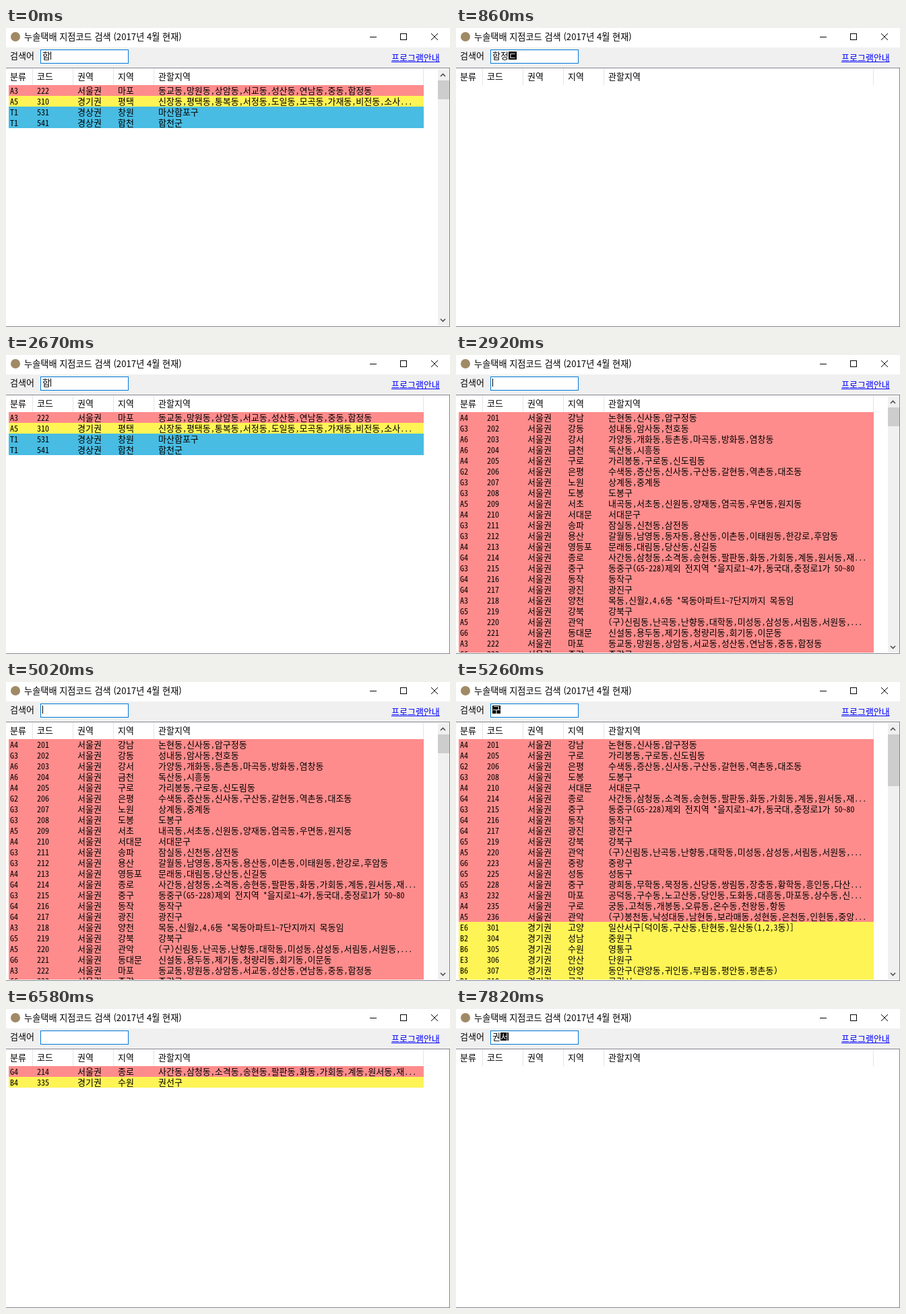
An HTML page for the animation above (8000 ms loop, 659 by 445 pixels).

```html
<!DOCTYPE html>
<html lang="ko">
<head>
<meta charset="utf-8">
<style>
  html, body { margin: 0; width: 100%; height: 100%; overflow: hidden; background: #fff; }
  body, body * { position: absolute; box-sizing: border-box; white-space: pre; }
  body { font: 13px/16px 'Noto Sans Mono CJK KR', 'Noto Sans CJK KR', 'Noto Sans CJK', monospace; color: #000; }
  #icon { left: 7px; top: 6px; width: 14px; height: 14px; border-radius: 50%; background: #a08a66; }
  #title { left: 27px; top: 4px; font: 13.2px/18px 'Noto Sans CJK KR', 'Noto Sans CJK', sans-serif; }
  #tools { left: 0; top: 29px; width: 659px; height: 30px; background: #f0f0f0; }
  #label { left: 6px; top: 4px; }
  #box { left: 51px; top: 3px; width: 131px; height: 21px; border: 1px solid #0078d7; background: #fff; }
  #field { left: 2px; top: 2px; height: 12px; line-height: 12px; }
  #field * { position: static; display: inline-block; height: 12px; vertical-align: top; overflow: hidden; }
  #field b { background: #000; color: #fff; font-weight: 400; }
  #field i { width: 1px; background: #000; }
  #link { left: 572px; top: 7px; color: #00f; text-decoration: underline; }
  #list { left: 0; top: 59px; width: 659px; height: 386px; border: 1px solid #828790; border-left: 0; overflow: hidden; }
  #head { left: 0; top: 0; }
  #head span { top: 4px; }
  #head i { top: 0; width: 1px; height: 25px; background: #e5e5e5; }
  #rows { left: 4px; top: 25px; width: 616px; height: 358px; overflow: hidden; }
  #rows div { left: 0; width: 616px; height: 16px; font-size: 12px; line-height: 15px; }
  #rows b { position: static; font-size: 13px; font-weight: 400; line-height: 1; }
  #bar { left: 641px; top: 1px; width: 17px; height: 382px; background: #f0f0f0; }
  #thumb { left: 0; top: 17px; width: 17px; background: #cdcdcd; }
  svg { left: 0; top: 0; fill: none; }
</style>
</head>
<body>
<div id="icon"></div>
<div id="title">누솔택배 지점코드 검색 (2017년 4월 현재)</div>
<svg width="659" height="28" stroke="#000">
  <path d="M540 13.5h10M585.5 8.5h9v9h-9z" shape-rendering="crispEdges"/>
  <path d="M631 8l10 10M641 8l-10 10"/>
</svg>
<div id="tools">
  <span id="label">검색어</span>
  <div id="box"><div id="field"></div></div>
  <span id="link">프로그램안내</span>
</div>
<div id="list">
  <div id="head"></div>
  <div id="rows"></div>
  <div id="bar">
    <div id="thumb"></div>
    <svg width="17" height="382" stroke="#505050" stroke-width="1.6"><path d="M4 11l3.500-3.500 3.500 3.500M4 372l3.500 3.500 3.500-3.500"/></svg>
  </div>
</div>
<script>
const LOOP = 8000, VISIBLE = 23, MAX_CELLS = 64;
const COLUMNS = [6, 46, 106, 166, 226];
const ZONES = { 2: ['서울권', '#ff8c8c'], 3: ['경기권', '#fff455'], 5: ['경상권', '#48bce3'] };

const branches = `A4 201 강남 논현동,신사동,압구정동
G3 202 강동 성내동,암사동,천호동
A6 203 강서 가양동,개화동,등촌동,마곡동,방화동,염창동
A6 204 금천 독산동,시흥동
A4 205 구로 가리봉동,구로동,신도림동
G2 206 은평 수색동,증산동,신사동,구산동,갈현동,역촌동,대조동
G3 207 노원 상계동,중계동
G3 208 도봉 도봉구
A5 209 서초 내곡동,서초동,신원동,양재동,염곡동,우면동,원지동
A4 210 서대문 서대문구
G3 211 송파 잠실동,신천동,삼전동
G3 212 용산 갈월동,남영동,동자동,용산동,이촌동,이태원동,한강로,후암동
A4 213 영등포 문래동,대림동,당산동,신길동
G4 214 종로 사간동,삼청동,소격동,송현동,팔판동,화동,가회동,계동,원서동,재동,권농동,구기동
G3 215 중구 동중구(G5-228)제외 전지역 *을지로1~4가,동국대,충정로1가 50~80
G4 216 동작 동작구
G4 217 광진 광진구
A3 218 양천 목동,신월2,4,6동 *목동아파트1~7단지까지 목동임
G5 219 강북 강북구
A5 220 관악 (구)신림동,난곡동,난향동,대학동,미성동,삼성동,서림동,서원동,신원동
G6 221 동대문 신설동,용두동,제기동,청량리동,회기동,이문동
A3 222 마포 동교동,망원동,상암동,서교동,성산동,연남동,중동,합정동
G6 223 중랑 중랑구
G5 225 성동 성동구
G5 228 중구 광희동,무학동,묵정동,신당동,쌍림동,장충동,황학동,흥인동,다산동,예관동
A3 232 마포 공덕동,구수동,노고산동,당인동,도화동,대흥동,마포동,상수동,신수동,아현동
A4 235 구로 궁동,고척동,개봉동,오류동,온수동,천왕동,항동
A5 236 관악 (구)봉천동,낙성대동,남현동,보라매동,성현동,은천동,인헌동,중앙동,청림동
E6 301 고양 일산서구[덕이동,구산동,탄현동,일산동(1,2,3동)]
B2 304 성남 중원구
B6 305 수원 영통구
E3 306 안산 단원구
B6 307 안양 동안구(관양동,귀인동,부림동,평안동,평촌동)
A5 310 평택 신장동,평택동,통복동,서정동,도일동,모곡동,가재동,비전동,소사동,합정동
B1 318 구리 구리시
B4 335 수원 권선구
T1 531 창원 마산합포구
T1 541 합천 합천군`.split('\n').map(line => {
  const [, group, code, region, area] = line.match(/^(\S+) (\S+) (\S+) (.*)$/);
  const [zone, color] = ZONES[code[0]];
  return { cells: [group, code, zone, region, shorten(area)], color, keys: region + ' ' + area };
});

// Start time, search query, field content ([x] = composing block, | = caret), scroll thumb height
const states = [
  [0, '합', '합|', 28],
  [120, '합ㅈ', '합[ㅈ]'],
  [240, '합저', '합[저]'],
  [730, '합정', '합[정]'],
  [850, '합정ㄷ', '합정[ㄷ]'],
  [980, '합정동', '합정[동]'],
  [1480, '합정동', '합정동'],
  [1820, '합정도', '합정[도]'],
  [1940, '합정도', '합정'],
  [2060, '합정ㄷ', '합정[ㄷ]'],
  [2430, '합정', '합정|'],
  [2670, '합', '합|'],
  [2920, '', '|', 28],
  [3410, '', '', 28],
  [3910, '', '|', 28],
  [4520, '', '', 28],
  [5020, '', '|', 28],
  [5140, 'ㄱ', '[ㄱ]'],
  [5260, '구', '[구]', 77],
  [5380, '궈', '[궈]'],
  [5630, '궈', '[권]'],
  [5750, '권', '[권]'],
  [6210, '권', '권'],
  [6580, '권', ''],
  [6705, '권서', '권[서]'],
  [6830, '권선', '권[선]'],
  [7320, '권선', '권선'],
  [7820, '권서', '권[서]'],
];

const $ = id => document.getElementById(id);
const cellAt = (text, x) => `<span style="left:${x}px">${text}</span>`;
// Hangul is set one size larger, so that it is twice as wide as Latin
const mixed = text => text.replace(/[가-힣]+/g, '<b>$&</b>');

// Hangul takes two cells, everything else one
function shorten(text) {
  const width = s => [...s].reduce((sum, c) => sum + (c > '\u00ff' ? 2 : 1), 0);
  if (width(text) <= MAX_CELLS) return text;
  while (width(text) > MAX_CELLS - 3) text = text.slice(0, -1);
  return text + '...';
}

function show([, query, content, thumb]) {
  $('field').innerHTML = content.replace(/\[(.)\]/, '<b>$1</b>').replace('|', '<i></i>');
  $('rows').innerHTML = branches.filter(b => b.keys.includes(query)).slice(0, VISIBLE)
    .map((b, i) => `<div style="top:${i * 16}px;background:${b.color}">` +
      b.cells.map((text, c) => cellAt(mixed(text), COLUMNS[c] - 4)).join('') + '</div>').join('');
  $('bar').hidden = !thumb;
  $('thumb').style.height = (thumb || 0) + 'px';
}

$('head').innerHTML =
  ['분류', '코드', '권역', '지역', '관할지역'].map((text, c) => cellAt(text, COLUMNS[c])).join('') +
  [39, 99, 159, 219, 619].map(x => `<i style="left:${x}px"></i>`).join('');

let current;
const start = performance.now();
function tick() {
  const t = (performance.now() - start) % LOOP;
  const next = states.findLast(s => s[0] <= t);
  if (next !== current) show(current = next);
  requestAnimationFrame(tick);
}
tick();
</script>
</body>
</html>
```
